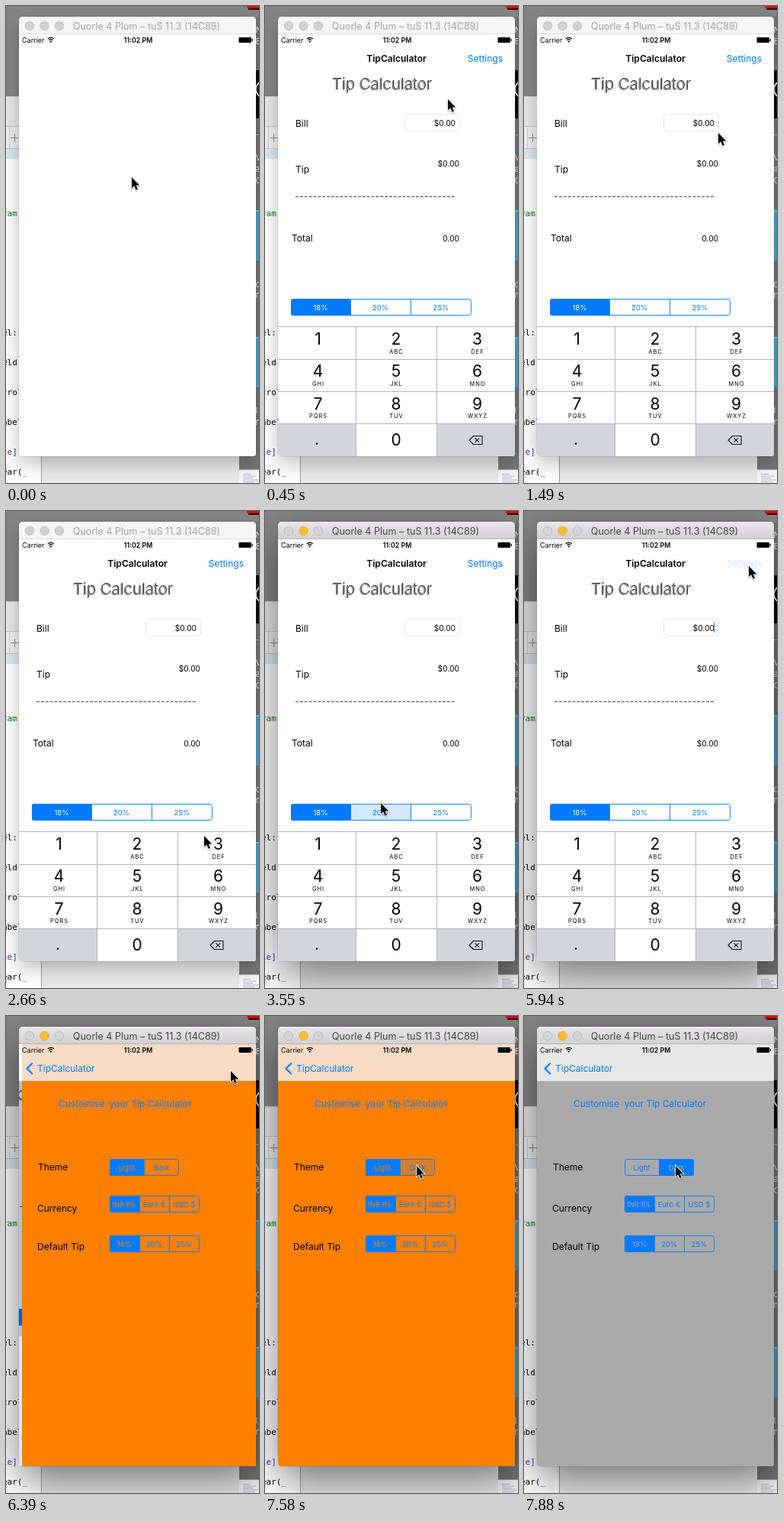
Animation of 332 by 624 pixels, one loop 8 s. Source, as an HTML page with a canvas:

```html
<!DOCTYPE html>
<html lang="en">
<head>
<meta charset="utf-8">
<title>Tip calculator</title>
<style>
  html, body { margin: 0; width: 100%; height: 100%; overflow: hidden; }
  canvas { display: block; width: 332px; height: 624px; }
</style>
</head>
<body>
<canvas id="stage"></canvas>
<script>
const W = 332, H = 624, LOOP = 8000;
const BLUE = '#007aff', SANS = 'Inter, "Liberation Sans", sans-serif';
const canvas = document.getElementById('stage');
const ctx = canvas.getContext('2d');
const dpr = window.devicePixelRatio || 1;
canvas.width = W * dpr;
canvas.height = H * dpr;

// Runs of evenly spaced updates: first, last, count.
const RUNS = [[150, 1050, 7], [1200, 2220, 8], [2370, 3410, 8], [3550, 4450, 7], [4600, 5640, 8],
  [5790, 5940, 2], [6390, 6540, 2], [6840, 7280, 4], [7580, 7880, 3]];
const TICKS = [0];
for (const [a, b, n] of RUNS)
  for (let i = 0; i < n; i++) TICKS.push(Math.round((a + (b - a) * i / (n - 1)) / 10) * 10);

// Pointer: time, x, y.
const PATH = [[0, 165, 224], [150, 165, 224], [450, 240, 122], [750, 320, 43], [1050, 295, 56],
  [1200, 287, 84], [1490, 255, 166], [1780, 200, 300], [1930, 149, 390], [2220, 200, 458],
  [2520, 260, 425], [2960, 225, 400], [3410, 152, 384], [3550, 152, 382], [3700, 153, 383],
  [4000, 230, 388], [4150, 230, 388], [4450, 87, 390], [4750, 87, 390], [5490, 295, 72],
  [6540, 295, 72], [6840, 282, 98], [7130, 214, 180], [7280, 199, 196], [LOOP, 199, 196]];

const clamp = v => Math.max(0, Math.min(1, v));

function snap(t) {
  let s = 0;
  for (const tick of TICKS) if (tick <= t) s = tick;
  return s;
}

function pointerAt(t) {
  const i = Math.max(1, PATH.findIndex(p => p[0] >= t));
  const [t0, x0, y0] = PATH[i - 1], [t1, x1, y1] = PATH[i];
  const k = clamp((t - t0) / (t1 - t0));
  return [x0 + (x1 - x0) * k, y0 + (y1 - y0) * k];
}

function box(x, y, w, h, color) {
  ctx.fillStyle = color;
  ctx.fillRect(x, y, w, h);
}

function round(x, y, w, h, r) {
  ctx.beginPath();
  ctx.roundRect(x, y, w, h, r);
}

function disc(x, y, r, fill, edge) {
  ctx.beginPath();
  ctx.arc(x, y, r, 0, 7);
  ctx.fillStyle = fill;
  ctx.fill();
  if (!edge) return;
  ctx.lineWidth = 0.8;
  ctx.strokeStyle = edge;
  ctx.stroke();
}

function poly(points, close) {
  ctx.beginPath();
  points.forEach(([x, y]) => ctx.lineTo(x, y));
  if (close) ctx.closePath();
}

function label(s, x, y, size = 12, color = '#000', align = 'left', weight = 400, family = SANS) {
  ctx.font = `${weight} ${size}px ${family}`;
  ctx.textAlign = align;
  ctx.fillStyle = color;
  ctx.fillText(s, x, y);
}

function faded(alpha, draw) {
  ctx.save();
  ctx.globalAlpha *= alpha;
  draw();
  ctx.restore();
}

function desktop() {
  box(0, 0, W, H, '#858585');
  box(328, 14, 4, 592, '#757575');
  box(316, 0, 16, 3, '#f00000');
  box(318, 3, 14, 2, '#111');
  box(328, 84, 4, 63, '#0c0c0c');
  ctx.strokeStyle = '#eee';
  ctx.lineWidth = 2;
  ctx.beginPath();
  ctx.arc(339, 109, 11, 2, 4.4);
  ctx.stroke();
  box(328, 168, 4, 1, '#bbb');
  for (const y of [267, 433]) {
    box(328, y, 4, 66, '#48a5d3');
    box(328, y, 4, 2, '#83cdec');
  }
  [['N', 35], ['E', 50], ['V', 202], ['a', 217], ['G', 232], ['o', 368], ['m', 382], ['l', 533], ['n', 548]]
    .forEach(([s, y]) => label(s, 327.5, y, 11, '#eee'));

  // editor window on the left
  box(0, 118, 46, H - 118, '#fff');
  box(0, 118, 17, 39, '#e7e7e7');
  box(0, 118, 17, 1, '#cfcfcf');
  box(0, 157, 17, 30, '#efefef');
  box(0, 157, 17, 1, '#c2c2c2');
  box(4, 158, 1, 28, '#cfcfcf');
  box(6, 172, 11, 1, '#888');
  box(11, 167, 1, 11, '#888');
  box(0, 186, 17, 1, '#c2c2c2');
  box(0, 187, 17, 13, '#dce9f1');
  const code = (s, x, y, c = '#000') => label(s, x, y, 11, c, 'left', 400, '"DejaVu Sans Mono", monospace');
  code('ram', -5, 275, '#007d10');
  ['el:', 'eld', 'trol', 'abel'].forEach((s, i) => code(s, -5, 431 + 39 * i));
  code('le', -5, 587, '#5c2699');
  code(']', 8.2, 587, '#2440a8');
  code('ear(', -5, 613);
  code('_', 21.5, 613, '#7a2fa5');

  // panels along the bottom
  box(46, 585, 260, 39, '#e9e9e9');
  box(46, 585, 1, 39, '#9c9c9c');
  box(306, 585, 26, 21, '#777');
  box(306, 606, 26, 18, '#f7f7f7');
  box(306, 606, 26, 1, '#aaa');
  for (let i = 0; i < 5; i++) box(311, 612 + i * 2.5, 10 + (i * 7) % 11, 1, '#b9aed2');
}

function frame(active) {
  ctx.save();
  ctx.shadowColor = active ? 'rgba(0,0,0,.5)' : 'rgba(0,0,0,.25)';
  ctx.shadowBlur = (active ? 54 : 26) * dpr;
  ctx.shadowOffsetY = (active ? 18 : 9) * dpr;
  round(17, 14, 311, 575, 5);
  ctx.fillStyle = '#fff';
  ctx.fill();
  ctx.restore();
  round(16.75, 13.75, 311.5, 575.5, 5);
  ctx.strokeStyle = 'rgba(0,0,0,.22)';
  ctx.lineWidth = 0.5;
  ctx.stroke();

  const bar = ctx.createLinearGradient(0, 14, 0, 37);
  bar.addColorStop(0, active ? '#e9e7e9' : '#f6f6f6');
  bar.addColorStop(1, active ? '#d1cfd1' : '#f6f6f6');
  round(17, 14, 311, 23, [5, 5, 0, 0]);
  ctx.fillStyle = bar;
  ctx.fill();
  box(17, 36, 311, 1, active ? '#b8b6b8' : '#dcdcdc');
  [31, 50.5, 70].forEach((x, i) => active && i === 1
    ? disc(x, 26, 5.8, '#fdbd2f', '#dea035')
    : disc(x, 26, 5.8, active ? '#d3d5d8' : '#d0d0d0', active ? '#b6b8bb' : '#bdbdbd'));
  label('Quorle 4 Plum – tuS 11.3 (14C89)', 184.5, 31, 12.6, active ? '#444' : '#a2a2a2', 'center');
}

function statusBar() {
  label('Carrier', 21, 48, 9);
  ctx.strokeStyle = '#000';
  ctx.lineWidth = 1.2;
  for (const r of [3.3, 5.8]) {
    ctx.beginPath();
    ctx.arc(58.8, 47.2, r, -2.35, -0.8);
    ctx.stroke();
  }
  disc(58.8, 46.6, 1.1, '#000');
  label('11:02 PM', 173.5, 48, 8.8, '#000', 'center', 600);
  round(305.5, 41, 16.5, 7, 1.2);
  ctx.fillStyle = '#000';
  ctx.fill();
  box(322.7, 43, 1.2, 3, '#000');
}

// Segmented control; edges holds the left, inner and right borders.
function segments(names, edges, y, h, on, pressed, paper) {
  const x = edges[0], w = edges[edges.length - 1] - x;
  ctx.save();
  round(x, y, w, h, 3);
  ctx.clip();
  names.forEach((_, i) => {
    const tint = i === on ? BLUE : i === pressed ? 'rgba(0,122,255,.17)' : null;
    if (tint) box(edges[i], y, edges[i + 1] - edges[i], h, tint);
  });
  ctx.restore();
  round(x + 0.5, y + 0.5, w - 1, h - 1, 3);
  ctx.strokeStyle = BLUE;
  ctx.lineWidth = 0.9;
  ctx.stroke();
  edges.slice(1, -1).forEach(e => box(e, y, 0.9, h, BLUE));
  names.forEach((s, i) => label(s, (edges[i] + edges[i + 1]) / 2, y + h / 2 + 3.5, 9.5,
    i === on ? paper : BLUE, 'center'));
}

function keyboard(drop) {
  ctx.save();
  ctx.translate(0, drop);
  box(17, 419, 311, 170, '#fff');
  box(17, 546, 102, 43, '#d2d5da');
  box(225, 546, 103, 43, '#d2d5da');
  for (const y of [419, 462, 504, 546]) box(17, y, 311, 1, '#b4b6ba');
  for (const x of [119, 225]) box(x, 419, 1, 170, '#b4b6ba');
  const letters = ['', 'ABC', 'DEF', 'GHI', 'JKL', 'MNO', 'PQRS', 'TUV', 'WXYZ'];
  letters.forEach((s, i) => {
    const x = [69.5, 172, 278.5][i % 3], y = 443 + Math.floor(i / 3) * 42.3;
    label(i + 1, x, y, 21, '#000', 'center');
    ctx.letterSpacing = '1px';
    label(s, x + 0.5, y + 11.5, 7.4, '#000', 'center');
    ctx.letterSpacing = '0px';
  });
  label('0', 172, 575, 21, '#000', 'center');
  label('.', 68, 574, 21, '#000', 'center');
  ctx.strokeStyle = '#111';
  ctx.lineWidth = 1.1;
  ctx.lineJoin = 'round';
  poly([[268, 568], [273.5, 562.5], [285, 562.5], [285, 573.5], [273.5, 573.5]], true);
  ctx.stroke();
  poly([[275.5, 565.3], [281, 570.7]]);
  ctx.stroke();
  poly([[281, 565.3], [275.5, 570.7]]);
  ctx.stroke();
  ctx.restore();
}

function calculator(t) {
  label('TipCalculator', 172.5, 73, 12.1, '#000', 'center', 600);
  faded(t >= 5640 ? 0.2 : 1, () => label('Settings', 312, 73, 12, BLUE, 'right'));
  label('Tip Calculator', 88.2, 109.2, 20.4, '#333', 'left', 300);
  label('Tip Calculator', 87, 110, 20.4, '#8c8c8c', 'left', 300);
  label('Bill', 40, 158);
  label('Tip', 40, 218);
  label('Total', 35, 308);
  round(183.5, 141.5, 72, 22, 4);
  ctx.strokeStyle = '#e6e6e6';
  ctx.lineWidth = 0.9;
  ctx.stroke();
  label('$0.00', 250, 156.5, 10.2, '#000', 'right');
  label('$0.00', 255, 210, 10.2, '#000', 'right');
  label(t < 3700 ? '0.00' : '$0.00', 255, 307.5, 10.2, '#000', 'right');
  for (let x = 40; x < 249; x += 5.85) box(x, 249, 4, 1, '#484848');

  const phase = (t + 250) % 1000;
  const glow = phase < 500 ? clamp(phase / 100) : clamp((600 - phase) / 100);
  if (t >= 450) faded(glow, () => box(249, 145, 1, 14, '#426bf2'));

  const on = t < 3700 ? 0 : t < 4150 ? 1 : t < 4750 ? 2 : 0;
  const pressed = t === 3550 ? 1 : t === 4000 ? 2 : t === 4600 ? 0 : -1;
  segments(['18%', '20%', '25%'], [34, 112, 191, 271], 383, 22, on, pressed, '#fff');
}

function settings(t) {
  const dark = t >= 7730, paper = dark ? '#aaaaaa' : '#ff8000';
  const shift = t < 6540 ? 4 : 0;
  box(17 + shift, 37, 311 - shift, 552, paper);
  box(17 + shift, 37, 311 - shift, 48, dark ? '#e8e8e8' : '#f9dcc6');
  ctx.strokeStyle = BLUE;
  ctx.lineWidth = 2.1;
  ctx.lineJoin = 'miter';
  poly([[34.8, 61.5], [27.6, 68.7], [34.8, 75.9]]);
  ctx.stroke();
  label('TipCalculator', 41, 73, 12, BLUE);

  ctx.save();
  ctx.translate(shift, 0);
  label('Customise  your Tip Calculator', 65, 119, 12, BLUE);
  label('Theme', 38, 202);
  label('Currency', 37, 256);
  label('Default Tip', 37, 306);
  const thirds = [132, 171, 210, 250];
  segments(['Light', 'Dark'], [132, 177, 223], 187, 22, dark ? 1 : 0, t === 7580 ? 1 : -1, paper);
  segments(['INR Rs.', 'Euro €', 'USD $'], thirds, 235, 22, 0, -1, paper);
  segments(['18%', '20%', '25%'], thirds, 287, 22, 0, -1, paper);
  ctx.restore();
}

function app(t) {
  ctx.save();
  round(17, 37, 311, 552, [0, 0, 4, 4]);
  ctx.clip();
  box(17, 37, 311, 552, '#fff');
  if (t >= 6390) {
    // the page underneath trails the push; the keyboard area stays lighter
    if (t < 6540) {
      ctx.save();
      ctx.translate(-92, 0);
      calculator(t);
      ctx.restore();
      box(17, 85, 311, 334, 'rgba(0,0,0,.25)');
      box(17, 419, 311, 170, '#e6e6e6');
    }
    settings(t);
  } else if (t >= 150) {
    faded(t < 300 ? 0.45 : 1, () => calculator(t));
    if (t >= 300) keyboard(t < 450 ? 80 : 0);
  }
  statusBar();
  ctx.restore();
}

function pointer([x, y]) {
  ctx.save();
  ctx.translate(x, y);
  ctx.shadowColor = 'rgba(0,0,0,.35)';
  ctx.shadowBlur = 2 * dpr;
  ctx.shadowOffsetY = dpr;
  poly([[0, 0], [0, 14.2], [3.2, 11.2], [5.6, 16.8], [8, 15.8], [5.7, 10.4], [10.2, 10.4]], true);
  ctx.lineJoin = 'miter';
  ctx.lineWidth = 1.8;
  ctx.strokeStyle = '#fff';
  ctx.stroke();
  ctx.shadowColor = 'transparent';
  ctx.fillStyle = '#000';
  ctx.fill();
  ctx.restore();
}

const start = performance.now();

function draw() {
  const t = snap((performance.now() - start) % LOOP);
  ctx.setTransform(dpr, 0, 0, dpr, 0, 0);
  desktop();
  frame(t >= 3550);
  app(t);
  pointer(pointerAt(t));
  requestAnimationFrame(draw);
}
draw();
</script>
</body>
</html>
```
